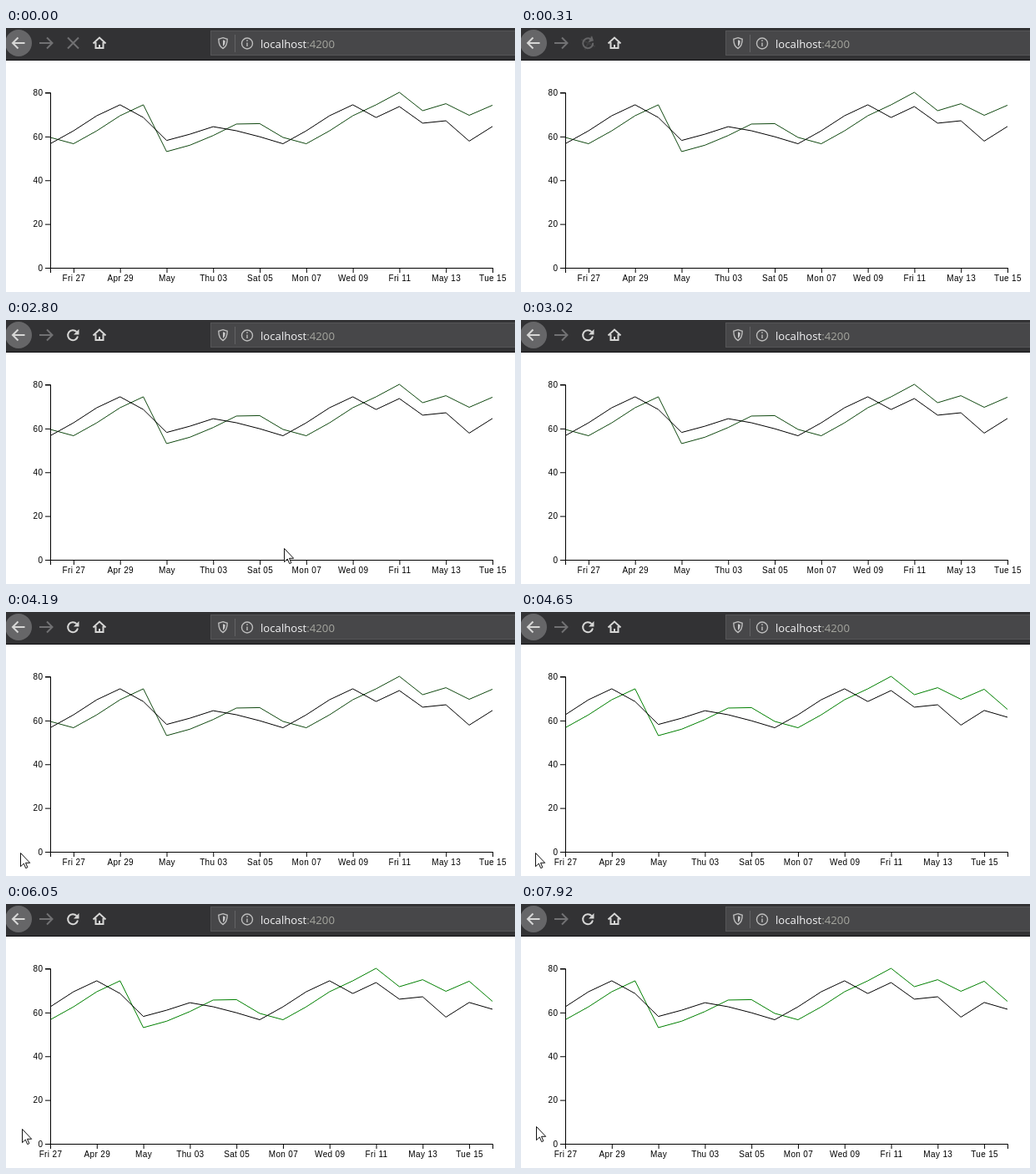
An HTML page for the animation above (8 s loop, 610x316 px).

```html
<!DOCTYPE html>
<html lang="en">
<head>
<meta charset="utf-8">
<title>Live line chart</title>
<style>
  html, body { margin: 0; width: 100%; height: 100%; overflow: hidden; background: #fff; }
  svg { display: block; }
  .icon { fill: none; stroke: #d7d7d6; stroke-width: 2; }
  .dim { stroke: #717173; }
  .thin { stroke: #bdbdbd; stroke-width: 1.4; }
  .url { font: 13.2px "Open Sans", sans-serif; fill: #f6f6f7; }
  .url tspan { fill: #a5a69f; }
  .line { fill: none; stroke: #000; }
  .label { font: 10px "Liberation Sans", Arial, sans-serif; letter-spacing: .35px; }
</style>
</head>
<body>
<svg width="610" height="316" viewBox="0 0 610 316">
  <rect width="610" height="39" fill="#323234"/>
  <rect y="38" width="610" height="1" fill="#0e0e10"/>
  <circle cx="15" cy="18" r="16" fill="#666668"/>
  <path class="icon" d="M22.5 18H8.5M14.5 11.5L8 18l6.5 6.5"/>
  <path class="icon dim" d="M40 18h15M49 11.5L55.5 18L49 24.5"/>
  <path id="stop" class="icon dim" d="M74 11.5l13 13M87 11.5l-13 13"/>
  <g id="reload">
    <path class="icon" d="M84.6 14.2A6 6 0 1 0 86 19.5"/>
    <path id="head" d="M87.500 11v6.500H81z"/>
  </g>
  <path class="icon" d="M104.500 18.500L112 11.500l7.500 7M107.500 17v7h9V17M112 20v4"/>

  <rect x="245.5" y="3.5" width="380" height="29" fill="#474749" stroke="#555557"/>
  <path class="icon thin" d="M260 11.7l5.200 1.600c0 5.500-1.200 9.200-5.200 11.200c-4-2-5.200-5.700-5.200-11.200z"/>
  <path d="M260 14.300l2.700 .9c0 3.300-.7 5.300-2.700 6.700z" fill="#c8c8c9"/>
  <path d="M274.5 8v21" stroke="#646466"/>
  <circle class="icon thin" cx="289" cy="18.500" r="6.500"/>
  <path class="icon thin" d="M289 17.500v4.500M289 14.300v1.700"/>
  <text class="url" x="305" y="24">localhost<tspan>:4200</tspan></text>

  <path id="green" class="line"/>
  <path id="black" class="line"/>
  <path id="axes" class="line"/>
  <g id="yLabels" class="label" text-anchor="end"></g>
  <g id="xLabels" class="label" text-anchor="middle"></g>
  <path id="cursor" d="M.5 .5v16.200l3.800-3.600l2.400 5.500l2.200-.9l-2.400-5.400h5.200z" fill="#fff" stroke="#111"/>
</svg>
<script>
const $ = id => document.getElementById(id);
const LOOP = 8000, SHIFT_AT = 4650, DAY = 864e5;
const LEFT = 53, RIGHT = 583, TOP = 77, BASE = 287, DAYS = 19, PEAK = 80.2;
const xOf = day => LEFT + day * (RIGHT - LEFT) / DAYS;
const yOf = value => BASE - value * (BASE - TOP) / PEAK;

// Evenly spaced values from one turning point up to, but not including, the next.
const ramp = (from, to, steps, bend = 1) =>
  Array.from({ length: steps }, (_, k) => from + (to - from) * (k / steps) ** bend);

// Both series share the same climb, which comes back after ten days.
const climb = [56.7, 62.6, 69.5, 74.5];
const black = [...climb, 68.7, ...ramp(58.2, 64.5, 2, 1.14), ...ramp(64.5, 56.7, 3, 1.3),
  ...climb, 68.7, 73.7, 66.1, 67.2, 57.9, 64.6, 61.5];
const green = [59.6, ...climb, ...ramp(53.1, 65.7, 3, 1.33), 65.7, 65.9, 59.6,
  ...climb, PEAK, 71.8, 75, 69.7, 74.3, 65.1];

const linePath = (values, shift) => 'M' + values.slice(shift, shift + DAYS + 1)
  .map((value, day) => `${xOf(day)} ${yOf(value)}`).join('L');

const label = (text, x, y) => `<text x="${x}" y="${y}">${text}</text>`;

// Month name on the first, month and day on Sundays, otherwise weekday and day.
function dateLabel(day) {
  const [weekday, date, month] = new Date(Date.UTC(2012, 3, 26) + day * DAY)
    .toUTCString().replace(',', '').split(' ');
  return date === '01' ? month : `${weekday === 'Sun' ? month : weekday} ${date}`;
}

function drawChart(shift) {
  $('black').setAttribute('d', linePath(black, shift));
  $('green').setAttribute('d', linePath(green, shift));
  $('green').style.stroke = shift ? '#008000' : '#0f480f';

  let axes = `M47 ${TOP + 0.5}H${LEFT + 0.5}V${BASE + 0.5}H47`
    + `M${LEFT + 0.5} 293V${BASE + 0.5}H${RIGHT + 0.5}V293`;
  let xLabels = '', yLabels = '';
  for (let value = 0; value <= 80; value += 20) {
    const y = yOf(value) + 0.5;
    axes += `M47 ${y}H${LEFT}`;
    yLabels += label(value, 44.3, y + 3.2);
  }
  for (let day = 1; day <= DAYS; day += 2) {
    const x = xOf(day - shift) + 0.5;
    axes += `M${x} ${BASE}V293`;
    xLabels += label(dateLabel(day), x, 303.1);
  }
  $('axes').setAttribute('d', axes);
  $('xLabels').innerHTML = xLabels;
  $('yLabels').innerHTML = yLabels;
}

// Progress from 0 to 1 that advances in whole steps.
const stepped = (t, start, end, steps) =>
  Math.min(1, Math.max(0, Math.floor((t - start) / (end - start) * steps) / steps));

function drawReload(t) {
  const p = stepped(t, 5, 380, 5);
  const color = t < 610 ? '#717173' : '#d7d7d6';
  $('stop').setAttribute('opacity', 1 - p);
  $('stop').setAttribute('transform', `rotate(${90 * p} 80.5 18)`);
  $('reload').setAttribute('opacity', p);
  $('reload').setAttribute('transform', `rotate(${90 * (p - 1)} 80.5 18)`);
  $('reload').firstElementChild.style.stroke = color;
  $('head').setAttribute('fill', color);
}

// The pointer crosses the axis and leaves, then returns at the left and creeps upwards.
function drawCursor(t) {
  const crossing = t >= 2800 && t < 3020, returned = t >= 4110;
  const cross = stepped(t, 2800, 3010, 3), settle = stepped(t, 4110, 4190, 1);
  const lift = stepped(t, 5910, 6050, 2), drift = t >= 7920 ? 1 : 0;
  const x = crossing ? 333 - 21 * cross : 17 + 2 * lift - drift;
  const y = crossing ? 273 + 27 * cross : 292 - 4 * settle - 19 * lift - 3 * drift;
  $('cursor').setAttribute('visibility', crossing || returned ? 'visible' : 'hidden');
  $('cursor').setAttribute('transform', `translate(${x} ${Math.round(y)})`);
}

let shown = -1;
function frame() {
  const t = performance.now() % LOOP;
  const shift = t < SHIFT_AT ? 0 : 1;
  if (shift !== shown) drawChart(shown = shift);
  drawReload(t);
  drawCursor(t);
  requestAnimationFrame(frame);
}
frame();
</script>
</body>
</html>
```
